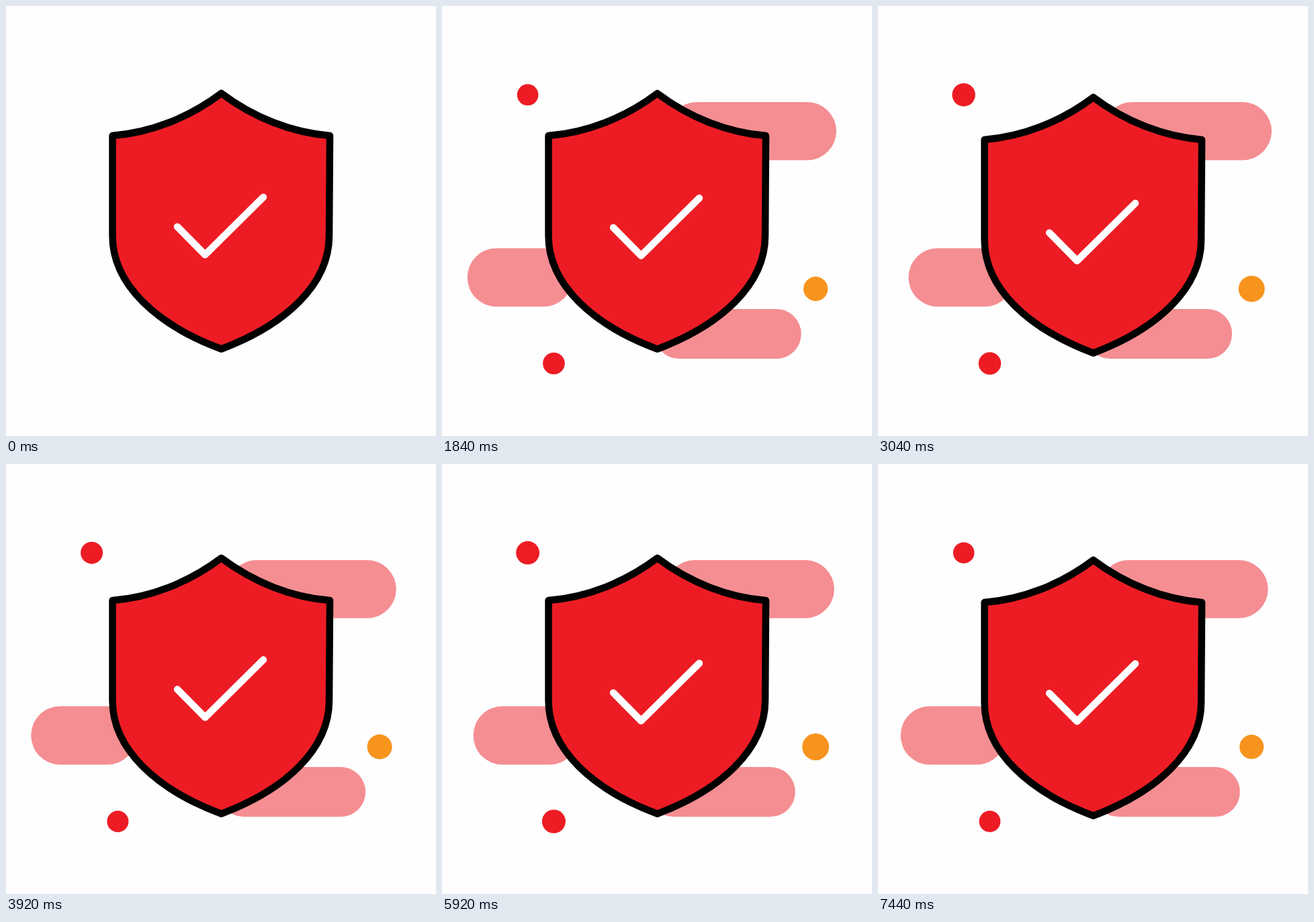
These frames come from a looping animation (640x640 px, 7520 ms). An HTML page:

```html
<!DOCTYPE html>
<html lang="en">
<head>
<meta charset="utf-8">
<title>Shield</title>
<style>
  html, body { margin: 0; width: 100%; height: 100%; overflow: hidden; background: #fefefe; }
  svg { display: block; width: 100%; height: 100%; }
  .pill { fill: #f58e92; }
  .red { fill: #ed1c24; }
  .orange { fill: #f7941d; }
  path { stroke-width: 10.5; stroke-linecap: round; stroke-linejoin: round; }
  #shield { fill: #ed1c24; stroke: #000; }
  #check { fill: none; stroke: #fff; }
</style>
</head>
<body>
<svg viewBox="0 0 640 640">
  <rect id="right" class="pill" y="143" width="251" height="86.5" rx="43.25"/>
  <rect id="left" class="pill" y="360.5" width="157" height="87" rx="43.5"/>
  <rect id="bottom" class="pill" y="451" width="218.5" height="74" rx="37"/>
  <circle id="dotTop" class="red" cx="127.6" cy="132.2"/>
  <circle id="dotLow" class="red" cx="166.4" cy="532"/>
  <circle id="dotSide" class="orange" cx="556.1" cy="421"/>
  <path id="shield" d="M320.5 130 C272 166.500 215 188.500 158.500 193 V342 C158.500 415 225 475 320.500 510.500 C415 475 481 415 481 342 L482 193 C426 188.500 369 166.500 320.500 130Z"/>
  <path id="check" d="M255 328.500 L296.300 370.300 L383 284.500"/>
</svg>
<script>
  const LOOP = 7520, STEP = 80, SWAY = 1520, PULSE = 760;
  const el = id => document.getElementById(id);
  const clamp = (v, lo, hi) => Math.min(hi, Math.max(lo, v));

  // 0 to 1 and back, resting outside the given span
  const wave = (t, from, to, period) =>
    0.5 - 0.5 * Math.cos(2 * Math.PI * (clamp(t, from, to) - from) / period);

  const easeOut = p => 1 - (1 - p) ** 3;
  const easeBack = p => 1 + 4.3 * (p - 1) ** 3 + 3.3 * (p - 1) ** 2;
  const enter = (t, length, ease) => ease(clamp(t / length, 0, 1));

  const dots = [
    { id: "dotLow", r: 15.9, grow: 1.65, from: 950, to: 7030 },
    { id: "dotSide", r: 18, grow: 2, from: 1010, to: 7090 },
    { id: "dotTop", r: 15.8, grow: 1.7, from: 1040, to: 7120 }
  ];

  function placePill(id, x, scale) {
    const node = el(id);
    const cx = x + node.width.baseVal.value / 2;
    const cy = node.y.baseVal.value + node.height.baseVal.value / 2;
    node.setAttribute("x", x);
    node.setAttribute("transform",
      `translate(${cx} ${cy}) scale(${scale}) translate(${-cx} ${-cy})`);
  }

  const drop = (id, y) => el(id).setAttribute("transform", `translate(0 ${y})`);

  function draw(t) {
    drop("shield", 13 * wave(t, 360, 7200, SWAY));
    drop("check", 12.7 * wave(t, 480, 7320, SWAY));

    const leftEdge = 33.6 + 13 * wave(t, 610, 6690, SWAY);
    const rightEdge = 580.5 + 6.7 * wave(t, -540, 7060, SWAY);
    const size = enter(t, 480, easeOut);
    placePill("left", leftEdge, size);
    placePill("bottom", 572.4 - leftEdge - 218.5, size);
    placePill("right", rightEdge - 251, size);

    for (const d of dots) {
      const r = d.r + d.grow * wave(t, d.from, d.to, PULSE);
      el(d.id).setAttribute("r", r * Math.max(0, enter(t, 640, easeBack)));
    }
  }

  const start = performance.now();
  function tick() {
    const t = (performance.now() - start) % LOOP;
    draw(Math.floor(t / STEP) * STEP);
    requestAnimationFrame(tick);
  }
  tick();
</script>
</body>
</html>
```
